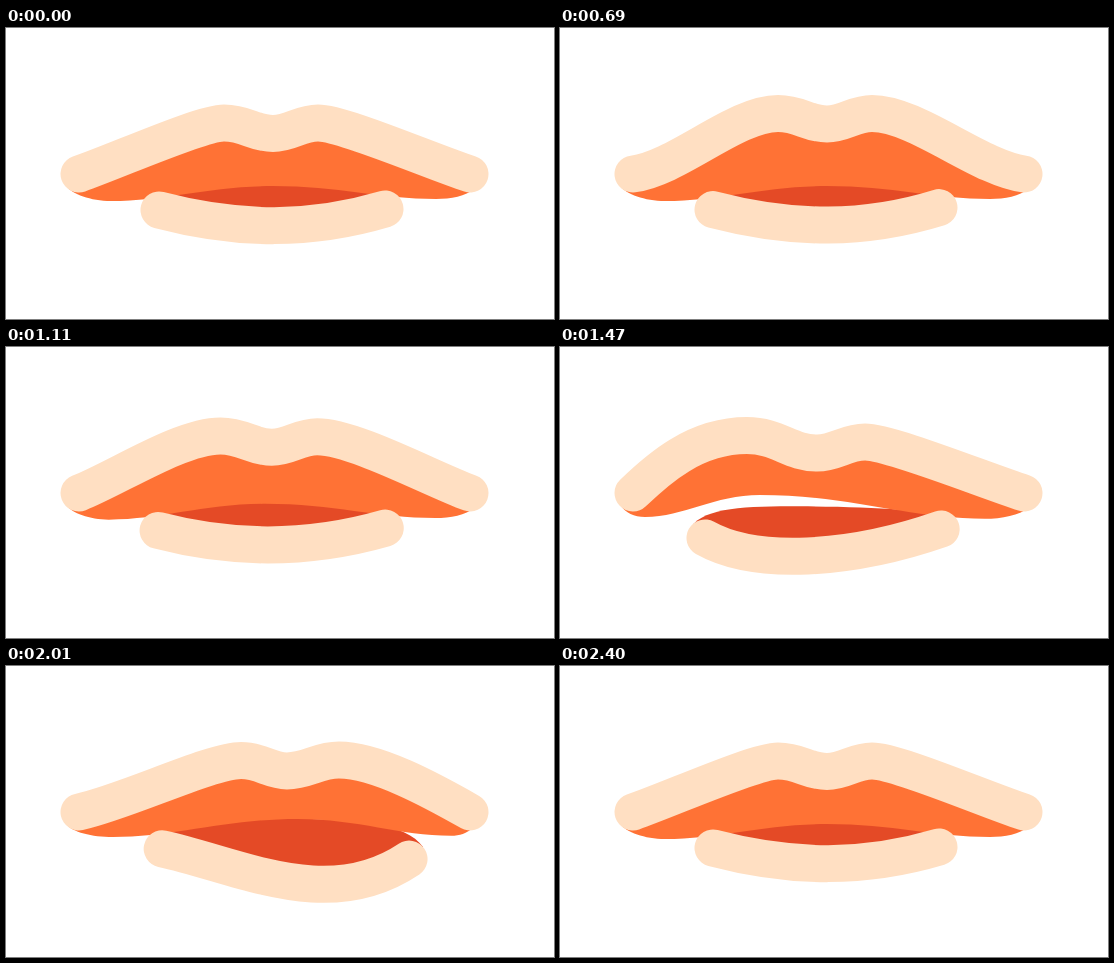
Animation, 548 px wide and 291 px high, one loop 4900 ms. Source, as an HTML page:

```html
<!DOCTYPE html>
<html lang="en">
<head>
<meta charset="utf-8">
<title>Lips</title>
<style>
  html, body { margin: 0; width: 100%; height: 100%; overflow: hidden; background: #fff; }
  svg { display: block; width: 100%; height: 100%; }
  .lip { fill: none; stroke: #ffdfc2; stroke-width: 37; stroke-linecap: round; }
</style>
</head>
<body>
<svg viewBox="0 0 548 291">
  <path id="mouth" fill="#e44a26"/>
  <path id="inner" fill="#ff7235"/>
  <path id="lower" class="lip"/>
  <path id="upper" class="lip"/>
</svg>
<script>
const LOOP = 4900, MOVE = 2400, STEP = 30;
const LEFT = [73, 146], RIGHT = [464, 146];

// Upper lip: handles by the corners (outL, outR), peaks with outer handle x (hx), dip.
// Lower lip: one cubic. Shade: lower edge of the orange area. Gap: top of the dark area.
const rest = {
  outL: [113, 132], outR: [424, 133], hx: [195, 337],
  peakL: [218, 95], dip: [267, 105.5], peakR: [312, 95],
  low: [153, 182, 233, 203, 305, 203, 379, 181],
  shade: [105, 173, 267, 158, 430, 171],
  gap: [267, 155]
};
const droop = { ...rest,
  outL: [137, 144], outR: [400, 144], hx: [192, 342],
  peakL: [218, 105], dip: [267, 115.5], peakR: [312, 105],
  low: [153, 179, 233, 207.7, 305, 207.7, 379, 177]
};
const high = { ...rest,
  outL: [108, 138], outR: [429, 138], hx: [166, 364],
  peakL: [218, 75], dip: [267, 85.5], peakR: [312, 75],
  low: [153, 183, 233, 199.7, 305, 199.7, 379, 181]
};
const raised = { ...rest,
  outR: [424, 131], hx: [180, 350],
  peakL: [218, 89], dip: [267, 99.5], peakR: [312, 89],
  low: [153, 182.5, 233, 201.5, 305, 201.5, 379, 181]
};
const smirkL = {
  outL: [78, 109], outR: [424, 136], hx: [76, 304],
  peakL: [146, 88], dip: [244, 114.5], peakR: [296, 103],
  low: [134.5, 202, 145, 242, 270, 230, 384, 183.5],
  shade: [59, 166, 112, 135, 418, 173],
  gap: [205, 165]
};
const smirkR = {
  outL: [124, 138], outR: [426, 120], hx: [219.5, 382],
  peakL: [245, 97.7], dip: [289, 108], peakR: [345, 97],
  low: [158, 183, 236, 199, 332, 274, 417, 200],
  shade: [108, 170, 306, 150, 454, 169],
  gap: [311, 152]
};
const keys = [
  [0, rest], [300, droop], [900, high], [1100, raised], [1300, smirkL],
  [1600, raised], [1900, smirkR], [2200, raised], [2400, rest]
];

const mix = (a, b, k) => a + (b - a) * k;

function poseAt(t) {
  const i = Math.max(1, keys.findIndex(key => key[0] >= t));
  const [t0, a] = keys[i - 1], [t1, b] = keys[i];
  const k = (t - t0) / (t1 - t0), pose = {};
  for (const name in a) pose[name] = a[name].map((v, j) => mix(v, b[name][j], k));
  return pose;
}

// Cubic with level tangents at both ends, starting from a.
const level = (a, b, ka, kb) =>
  `C${mix(a[0], b[0], ka)},${a[1]} ${mix(b[0], a[0], kb)},${b[1]} ${b}`;

const set = (id, d) => document.getElementById(id).setAttribute("d", d);

function draw(t) {
  const { outL, outR, hx, peakL, dip, peakR, low, shade, gap } = poseAt(t);

  const upper = `M${LEFT} C${outL} ${hx[0]},${peakL[1]} ${peakL}` +
    level(peakL, dip, 0.45, 0.39) + level(dip, peakR, 0.39, 0.4) +
    `C${hx[1]},${peakR[1]} ${outR} ${RIGHT}`;

  const sl = shade.slice(0, 2), sm = shade.slice(2, 4), sr = shade.slice(4);
  const inner = upper + `L468,161 C460,168 ${mix(sr[0], 467, 0.4)},${sr[1]} ${sr}` +
    level(sr, sm, 0.34, 0.4) + level(sm, sl, 0.4, 0.34) +
    `C${mix(sl[0], 60, 0.45)},${sl[1]} 66,166 60,158Z`;

  const lower = `M${low.slice(0, 2)} C${low.slice(2)}`;
  const a = [low[0] - 14, low[1] - 11], b = [low[6] + 14, low[7] - 12];
  const mouth = lower +
    `L${b} C${mix(b[0], gap[0], 0.14)},${gap[1] + 4} ${mix(gap[0], b[0], 0.45)},${gap[1]} ${gap}` +
    `C${mix(gap[0], a[0], 0.5)},${gap[1]} ${mix(a[0], gap[0], 0.13)},${gap[1] + 1} ${a}Z`;

  set("upper", upper);
  set("inner", inner);
  set("lower", lower);
  set("mouth", mouth);
}

let start;
function tick(now) {
  start ??= now;
  const t = (now - start) % LOOP;
  draw(Math.min(MOVE, Math.floor(t / STEP) * STEP));
  requestAnimationFrame(tick);
}
draw(0);
requestAnimationFrame(tick);
</script>
</body>
</html>
```
